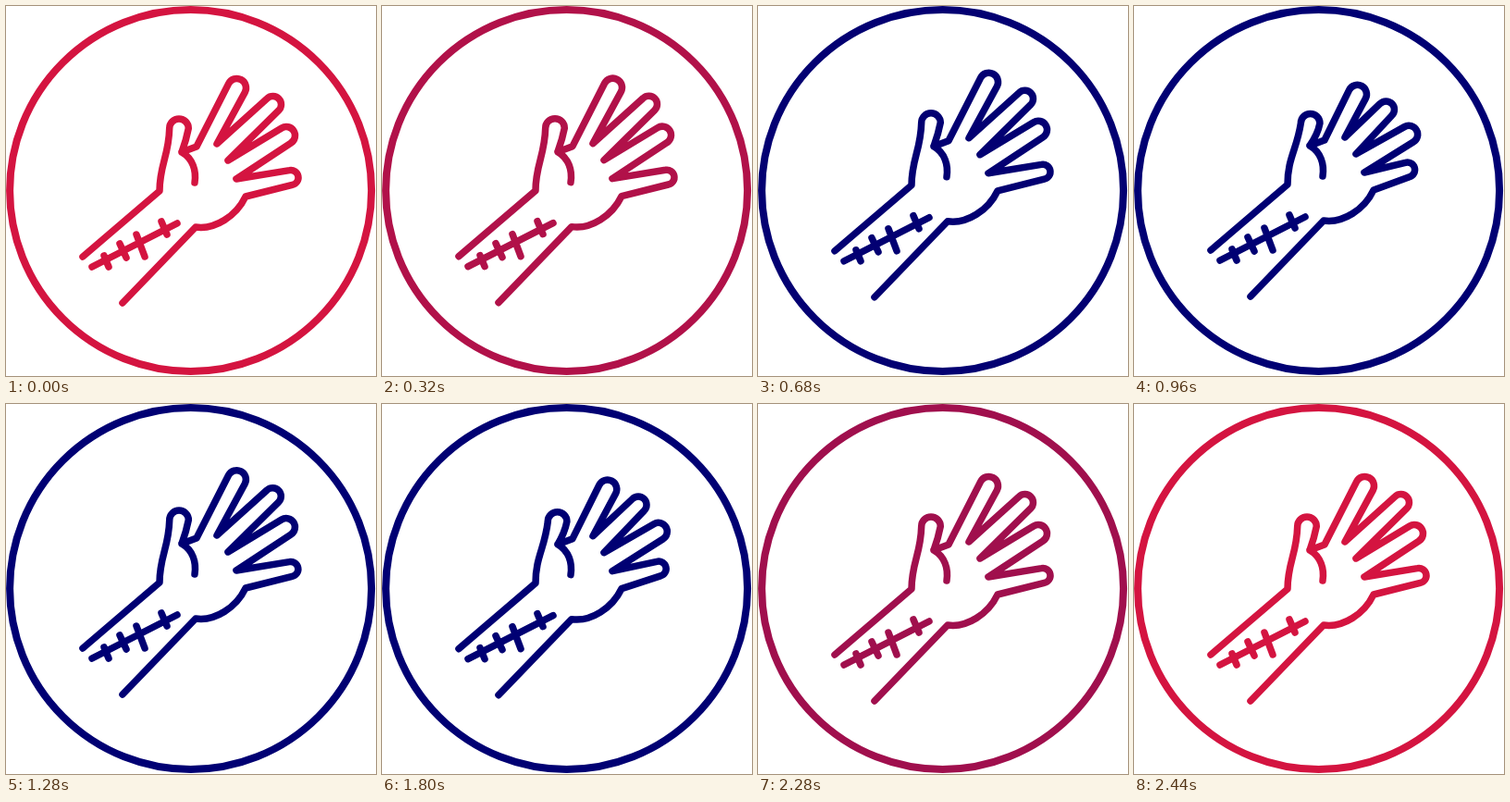
An HTML page with a canvas that plays this animation: 400x400 px, repeating every 2.64 s.

```html
<!DOCTYPE html>
<html lang="en">
<head>
<meta charset="utf-8">
<title>Hand with stitches</title>
<style>
  html, body { margin: 0; width: 100%; height: 100%; overflow: hidden; background: #fff; }
  canvas { display: block; width: 400px; height: 400px; }
</style>
</head>
<body>
<canvas id="stage" width="400" height="400"></canvas>
<script>
const ctx = document.getElementById('stage').getContext('2d');
const LOOP = 2640, STEP = 40;
const RED = [212, 20, 64], BLUE = [0, 0, 115];
const LIFT = 7, CURL = 1.57;

// base point, tip centre, tip shift when curled, tip radius, next knuckle
const fingers = [
  { base: [217, 150], tip: [249.5, 88.5], shift: [-5.5, 9.5], r: 10, end: [228, 149] },
  { base: [234, 158], tip: [288.5, 106.5], shift: [-11, 8.5], r: 9, end: [240, 167] },
  { base: [244, 177], tip: [303, 140], shift: [-4, 4], r: 9.5, end: [249, 187] },
  { base: [254, 196], tip: [308, 185.5], shift: [-8.5, -1], r: 8, end: [259, 206] }
];
const stitches = [
  [93, 282, 185, 235],
  [106, 270, 111, 282],
  [123, 257, 130, 272],
  [141, 247, 150, 271],
  [168, 233, 174, 247]
];

const ramp = (t, a, b) => Math.min(1, Math.max(0, (t - a) / (b - a)));
const smooth = x => x * x * (3 - 2 * x);
const sine = x => (1 - Math.cos(Math.PI * x)) / 2;
const wave = x => Math.sin(Math.PI * x) ** 2;

function mix(a, b, k) {
  return `rgb(${a.map((v, i) => Math.round(v + (b[i] - v) * k)).join(',')})`;
}

function pose(t) {
  return {
    color: mix(RED, BLUE, smooth(ramp(t, 180, 720)) - smooth(ramp(t, 1915, 2455))),
    lift: LIFT * (sine(ramp(t, 240, 800)) - sine(ramp(t, 1690, 2240))),
    curl: CURL * (wave(ramp(t, 720, 1300)) + wave(ramp(t, 1340, 2000)))
  };
}

function drawFinger(f, curl) {
  const x = f.tip[0] + f.shift[0] * curl;
  const y = f.tip[1] + f.shift[1] * curl;
  const a = Math.atan2(y - f.base[1], x - f.base[0]);
  ctx.arc(x, y, f.r, a - Math.PI / 2, a + Math.PI / 2);
  ctx.lineTo(...f.end);
}

function drawHand(curl) {
  const tx = 187 + 2.5 * curl, ty = 132.3 + curl;
  ctx.beginPath();

  // forearm, thumb and palm crease
  ctx.moveTo(83, 271);
  ctx.lineTo(166, 200);
  ctx.bezierCurveTo(166, 172, 176, 162, tx - 10.3, ty);
  ctx.arc(tx, ty, 10.3, Math.PI, Math.PI * 2);
  ctx.quadraticCurveTo(tx + 8, ty + 12, 190, 158);
  ctx.bezierCurveTo(202, 165, 206, 178, 204, 191);

  // fingers, heel of the hand and lower arm
  ctx.moveTo(190, 158);
  ctx.lineTo(206, 152);
  fingers.forEach(f => drawFinger(f, curl));
  ctx.bezierCurveTo(249, 227, 226, 242, 205, 239);
  ctx.lineTo(126, 321);

  for (const [x1, y1, x2, y2] of stitches) {
    ctx.moveTo(x1, y1);
    ctx.lineTo(x2, y2);
  }
  ctx.stroke();
}

function draw(t) {
  const p = pose(t);
  ctx.fillStyle = '#fff';
  ctx.fillRect(0, 0, 400, 400);
  ctx.strokeStyle = p.color;
  ctx.lineCap = ctx.lineJoin = 'round';

  ctx.lineWidth = 8;
  ctx.beginPath();
  ctx.arc(199.6, 199.5, 195.5, 0, Math.PI * 2);
  ctx.stroke();

  ctx.save();
  ctx.translate(0, -p.lift);
  ctx.lineWidth = 7.5;
  drawHand(p.curl);
  ctx.restore();
}

const start = performance.now();
function tick() {
  const t = (performance.now() - start) % LOOP;
  draw(Math.floor(t / STEP) * STEP);
  requestAnimationFrame(tick);
}
tick();
</script>
</body>
</html>
```
